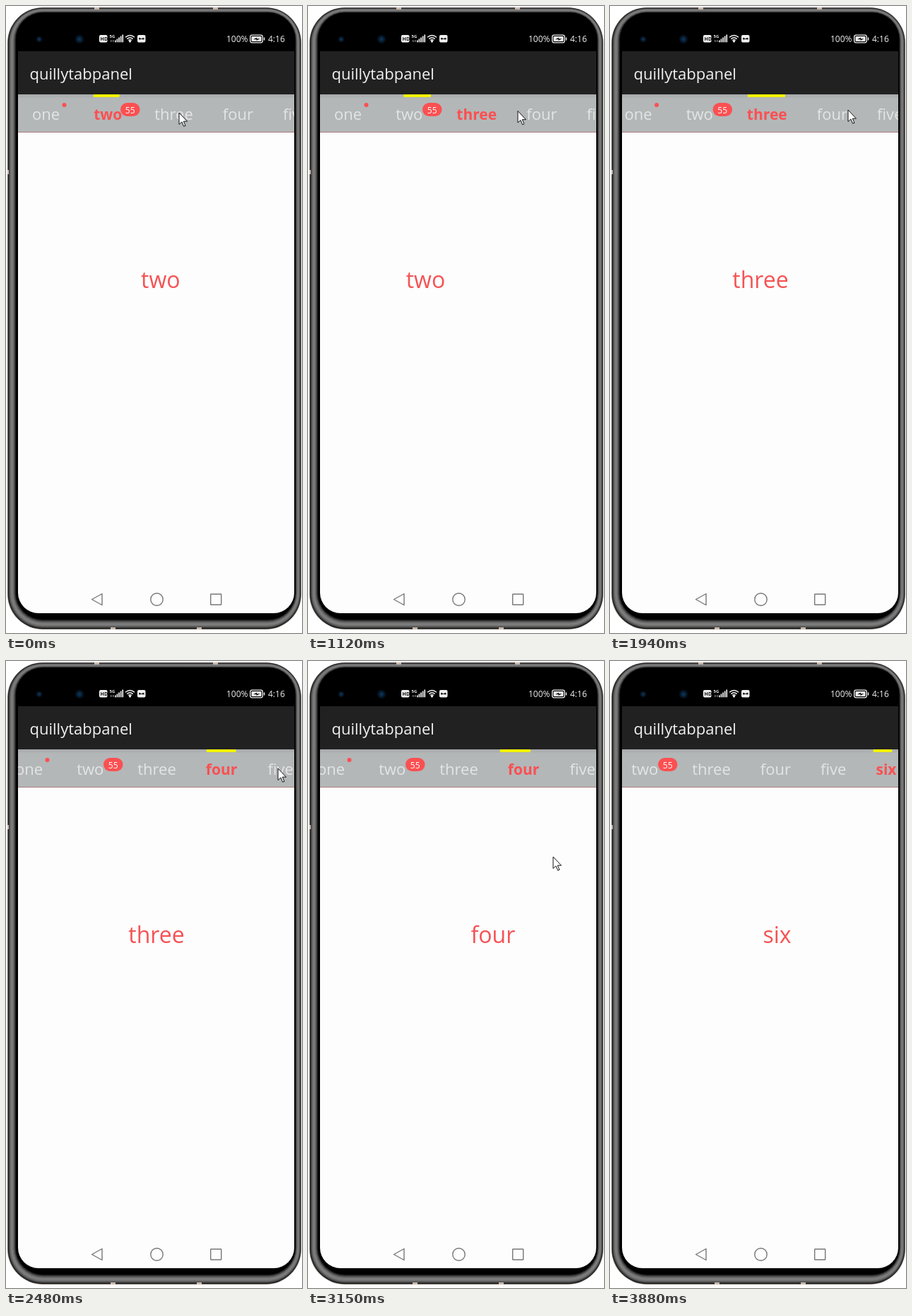
An HTML page for the animation above (3980 ms loop, 419 by 887 pixels).

```html
<!DOCTYPE html>
<html lang="en">
<head>
<meta charset="utf-8">
<title>Tab strip demo</title>
<style>
  html, body { margin: 0; width: 100%; height: 100%; overflow: hidden; background: #fff; }
  svg { display: block; width: 100%; height: 100%; }
  text { font-family: "Open Sans", "Noto Sans", sans-serif; }
  .title { font-size: 22px; fill: #f2f2f2; }
  .status { font-size: 12px; fill: #f0f0f0; }
  .tab { font-size: 22px; fill: #e4e5e5; }
  .tab.on { font-size: 21px; font-weight: 700; fill: #fb5052; }
  .page { font-size: 32px; fill: #f55355; text-anchor: middle; }
  .badge { font-size: 12px; fill: #fff; text-anchor: middle; }
  .line { fill: none; stroke: #777; stroke-width: 1.4; }
</style>
</head>
<body>
<svg viewBox="0 0 419 887">
  <defs>
    <linearGradient id="shade" x2="0" y2="1">
      <stop offset="0" stop-color="#a6a9aa"/>
      <stop offset=".12" stop-color="#b3b7b8"/>
    </linearGradient>
    <radialGradient id="lens">
      <stop offset="0" stop-color="#0d3a63"/>
      <stop offset="1" stop-color="#000"/>
    </radialGradient>
    <clipPath id="screen"><path d="M17 125H408V830a29 29 0 0 1-29 29H46a29 29 0 0 1-29-29Z"/></clipPath>
  </defs>

  <g id="shell"></g>
  <path d="M125 2h7v3h-7zM293 2h7v3h-7zM148 879h7v3h-7zM270 879h7v3h-7zM2 232h2v6h-2z" fill="#c9b9ac"/>
  <circle cx="47" cy="47" r="5" fill="url(#lens)"/>
  <circle cx="104" cy="47" r="7" fill="url(#lens)"/>

  <!-- status bar -->
  <g fill="#f0f0f0">
    <rect x="132" y="41" width="11.5" height="10.5" rx="2"/>
    <text x="133.6" y="49" font-size="7" font-weight="700" fill="#111">HD</text>
    <text x="146.5" y="45.2" font-size="6" font-weight="700">5G</text>
    <path d="M148 48h1.5v3h-1.5zM151 48h1.5v3h-1.5z" opacity=".5"/>
    <g id="signal"></g>
    <circle cx="175.5" cy="50" r="1.6"/>
    <path d="M169 44.3q6.5-5.6 13 0M171.3 46.6q4.2-3.6 8.4 0M173.3 48.6q2.2-1.8 4.4 0" fill="none" stroke="#f0f0f0" stroke-width="1.5"/>
    <rect x="186" y="41" width="11.5" height="10.5" rx="2"/>
    <path d="M188 45h2.5v2.5h-2.5zM193 45h2.5v2.5h-2.5zM190 46h4v1h-4z" fill="#222"/>
    <rect x="345.7" y="41.2" width="17.6" height="10.6" rx="2.5" fill="none" stroke="#f0f0f0" stroke-width="1.3"/>
    <rect x="347.5" y="43" width="14" height="7" rx="1"/>
    <path d="M364.8 44.5h1.5v4h-1.5z"/>
    <path d="M350 47.3l5-2.8v1.7h4.5l-5 2.9v-1.8z" fill="#111"/>
  </g>
  <text class="status" x="312" y="51">100%</text>
  <text class="status" x="371" y="51">4:16</text>

  <rect x="17" y="64" width="391" height="61" fill="#212121"/>
  <text class="title" x="33.5" y="104">quillytabpanel</text>

  <g clip-path="url(#screen)">
    <rect x="17" y="125" width="391" height="735" fill="#fdfdfd"/>
    <rect x="17" y="125" width="391" height="53.5" fill="url(#shade)"/>
    <rect x="17" y="178" width="391" height="1" fill="#b07c7e"/>
    <g id="strip">
      <rect id="bar" y="125" height="4" fill="#f3f300"/>
      <g id="tabs"></g>
      <circle cx="82.5" cy="140" r="3" fill="#fb5052"/>
      <rect x="162" y="137" width="27.5" height="19" rx="9.5" fill="#fb5052"/>
      <text class="badge" x="175.7" y="151.5">55</text>
    </g>
    <g id="pages"></g>
  </g>

  <g class="line">
    <path d="M121.5 839.5L136 831.5V847.5Z" stroke-linejoin="round"/>
    <circle cx="213.5" cy="839.5" r="8.7"/>
    <rect x="289.7" y="832" width="15" height="15" rx=".5"/>
  </g>
  <path id="cursor" d="M0 0V16.5L3.9 13 6.7 19.3 9 18.3 6.3 12.2H11.5Z" fill="#fff" stroke="#111"/>
</svg>

<script>
const LOOP = 3980, PAGE_W = 391, MID = 213;
const names = ['one', 'two', 'three', 'four', 'five', 'six'];

// The screen refreshes in even steps and skips a few; motion runs in refreshes.
const STEP = 137.5, LEAD = 14, LAST_STEP = 28;
const skipped = [1, 4, 5, 10, 11, 21];

// A tab is picked at "tap", its page slides in from "start".
const slides = [
  { tap: -9, start: -4.61, by: 1, to: 1 },
  { tap: 3, start: 3.88, by: 1, to: 2 },
  { tap: 13, start: 13.15, by: 1, to: 3 },
  { tap: 19, start: 17.555, by: 2, to: 5 }
];
const scrolls = [
  { start: 6.08, length: 4.7, by: 24 },
  { start: 17, length: 2, by: 70 }
];
const pointer = [
  [2, 245, 151], [3, 267, 152], [7, 327, 145], [9, 337, 147],
  [13, 385, 152], [17, 347, 277], [19, 359, 807], [20, 359, 900]
];

const $ = id => document.getElementById(id);
const set = (el, attrs) => {
  for (const key in attrs) el.setAttribute(key, attrs[key]);
  return el;
};
const add = (parent, tag, attrs, text = '') => {
  const el = set(document.createElementNS('http://www.w3.org/2000/svg', tag), attrs);
  el.textContent = text;
  return parent.appendChild(el);
};
const clamp = x => Math.min(1, Math.max(0, x));
const lerp = (a, b, u) => a + (b - a) * u;
const ease = u => (1 - Math.cos(Math.PI * clamp(u))) / 2;
const travel = (moves, now) =>
  moves.reduce((sum, m) => sum + m.by * ease((now - m.start) / (m.length || 5)), 0);

function refreshAt(t) {
  const step = Math.min(LAST_STEP, Math.floor((t + LEAD) / STEP));
  return step - skipped.filter(s => s <= step).length;
}

function pointerAt(now) {
  const next = pointer.findIndex(p => p[0] > now);
  if (next < 0) return pointer.at(-1).slice(1);
  const b = pointer[next], a = pointer[Math.max(0, next - 1)];
  const u = a === b ? 0 : (now - a[0]) / (b[0] - a[0]);
  return [lerp(a[1], b[1], u), lerp(a[2], b[2], u)];
}

// Metal rim: a tan edge, then rounded rings fading dark, grey, black
const RINGS = 16;
for (let i = 0; i <= RINGS; i++) {
  const u = i / RINGS, grey = 125 * Math.sin(Math.PI * u);
  const x = lerp(2, 14, u), y = lerp(2, 9.5, u);
  add($('shell'), 'rect', {
    x, y,
    width: lerp(418, 409.5, u) - x,
    height: lerp(882, 868, u) - y,
    rx: lerp(50, 38, u),
    fill: i ? `rgb(${grey},${grey},${grey})` : '#8b827c'
  });
}
for (let i = 0; i < 5; i++) {
  const height = 2.8 + 2 * i;
  add($('signal'), 'rect', { x: 154 + 2.6 * i, y: 51.3 - height, width: 1.7, height });
}

const tabs = names.map(n => add($('tabs'), 'text', { class: 'tab', y: 161 }, n));
const pages = names.map(n => add($('pages'), 'text', { class: 'page', y: 398.5 }, n));

// Labels sit side by side; the two with badges get extra room.
const widths = tabs.map(tab => tab.getComputedTextLength());
const lefts = [37];
widths.forEach((w, i) => lefts.push(lefts[i] + w + (i < 2 ? 48 : 42)));

function draw(t) {
  const now = refreshAt(t);
  const page = travel(slides, now);
  const slide = slides.findLast(s => s.tap <= now);
  const pick = slide.to;

  const at = now < slide.start ? pick : page;
  const i = Math.min(Math.floor(at), names.length - 2);
  set($('bar'), {
    x: lerp(lefts[i], lefts[i + 1], at - i) + 1,
    width: lerp(widths[i], widths[i + 1], at - i) - 1.5
  });
  set($('strip'), { transform: `translate(${-travel(scrolls, now)})` });

  // a bold label without a badge pushes its followers along
  tabs.forEach((tab, n) => set(tab, {
    class: n === pick ? 'tab on' : 'tab',
    x: lefts[n] + (pick > 1 && n > pick ? 2.5 : 0)
  }));
  pages.forEach((el, n) => set(el, { x: MID + (n - page) * PAGE_W }));
  set($('cursor'), { transform: `translate(${pointerAt(now)})` });
}

const start = performance.now();
function tick() {
  draw((performance.now() - start) % LOOP);
  requestAnimationFrame(tick);
}
tick();
</script>
</body>
</html>
```
